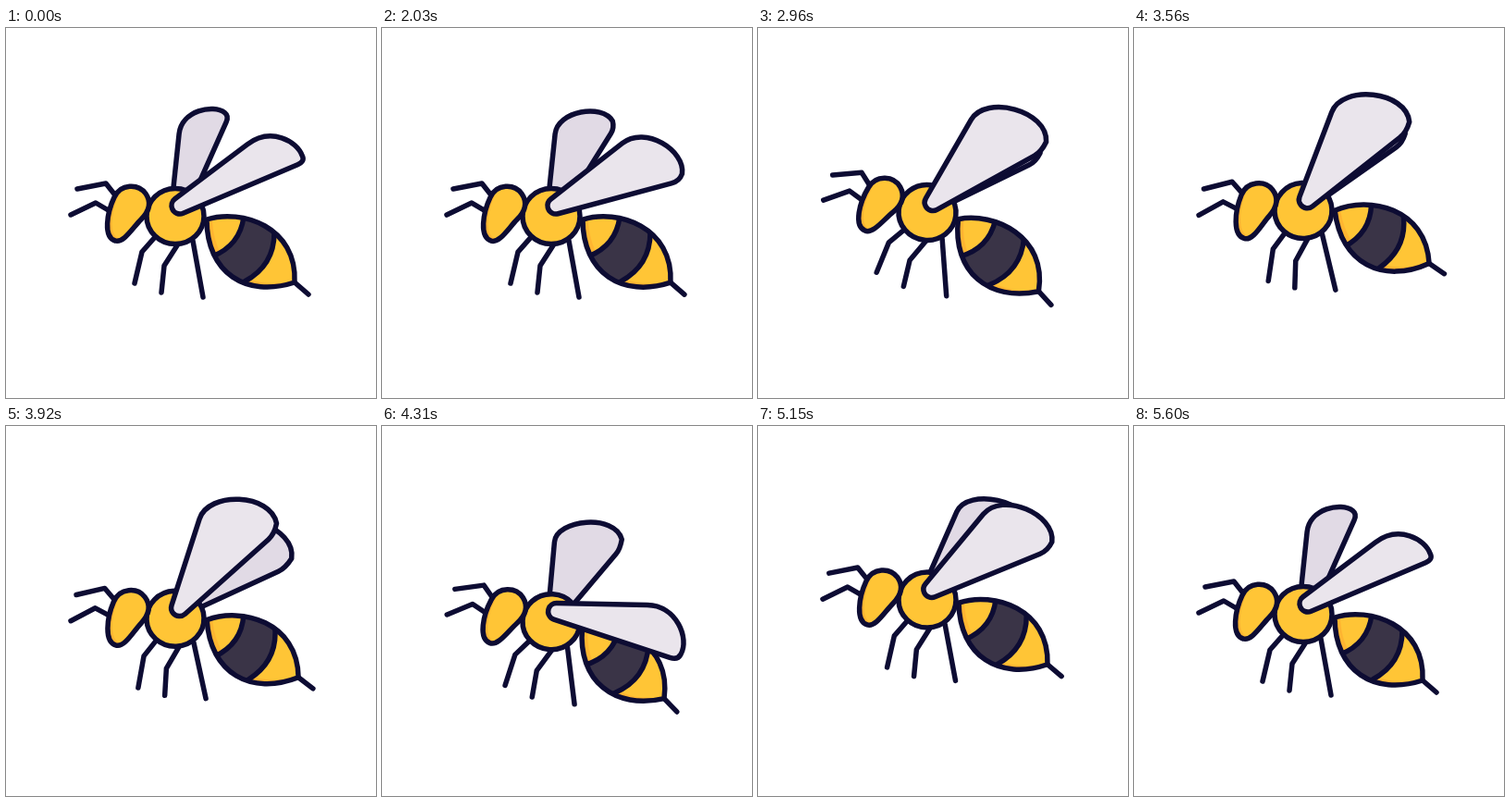
Animation, 400 px wide and 400 px high, one loop 5.66 s. Source, as an HTML page with a canvas:

```html
<!DOCTYPE html>
<html lang="en">
<head>
<meta charset="utf-8">
<title>Wasp</title>
<style>
html, body { margin: 0; width: 100%; height: 100%; overflow: hidden; background: #fff; }
canvas { display: block; width: 400px; height: 400px; }
</style>
</head>
<body>
<canvas id="stage" width="400" height="400"></canvas>
<script>
const ctx = document.getElementById('stage').getContext('2d');
const LOOP = 5660, START = 2030, STEP = 30, FLIGHT = 3600, FLAP = 300;
const INK = '#0d0c33', YELLOW = '#ffc536', ORANGE = '#ffb531', STRIPE = '#3a3447';
const RAD = Math.PI / 180, CENTER = [183, 203.5];

// Tracks: [ms, value] pairs, joined by a smooth spline
const bob = [[0, 0], [550, 8], [960, -4], [1280, -18], [1560, -6], [2260, 9], [2760, -14], [3000, -20], [3600, 0]];
const turn = [[0, 0], [400, 1.5], [900, 6], [960, 6], [1560, -3.2], [1740, -4], [2310, 3.2], [2650, 6.3], [2760, 6], [3300, -2], [3600, 0]];
const tail = [[0, 0], [450, 4.5], [900, 7], [1560, -6.3], [1740, -7], [2310, 5.2], [2480, 5.7], [2760, 4], [3300, -2], [3600, 0]];

// Wing tracks over one flap: angle of the leading edge, and spread in degrees
const frontEdge = [[0, -37], [30, -38], [60, -66], [100, -77], [150, -50], [180, -12], [210, -2], [250, -14], [300, -37]];
const frontSpread = [[0, 14], [30, 23], [60, 31], [150, 28], [210, 17], [300, 14]];
const backEdge = [[0, -84], [30, -84], [60, -62], [100, -52], [150, -66], [210, -88], [300, -84]];
const backSpread = [[0, 18], [30, 26], [60, 30], [150, 34], [210, 35], [300, 18]];

const head = new Path2D('M118 230C105 226 109 200 117 183C124 168 143 168 151 179C158 189 155 198 146 207C137 216 127 233 118 230Z');
const abdomen = new Path2D('M217 207C255 195 315 215 312 275C260 292 217 265 217 207Z');
const stripe = new Path2D('M257 204Q253 235 223 247L240 290L258 274Q291 256 290 219L280 190Z');
const thorax = new Path2D();
thorax.ellipse(...CENTER, 31, 30, 0, 0, 7);
const antennae = new Path2D('M77 174L108 168L119 182M70 202L97 189L114 199');
const frontLeg = new Path2D('M162 225L147 242L139 276');
const midLeg = new Path2D('M187 232L171 257L168 286');
const hindLeg = new Path2D('M202 230L213 291');
const stinger = new Path2D('M312 275L327 288');

function sample(track, t) {
  const last = track.length - 1;
  let i = 0;
  while (i < last - 1 && t > track[i + 1][0]) i++;
  const slope = k => k <= 0 || k >= last ? 0
    : (track[k + 1][1] - track[k - 1][1]) / (track[k + 1][0] - track[k - 1][0]);
  const [t0, a] = track[i], [t1, b] = track[i + 1];
  const d = t1 - t0, x = (t - t0) / d, y = 1 - x;
  return a * y * y * (1 + 2 * x) + b * x * x * (1 + 2 * y)
    + d * x * y * (slope(i) * y - slope(i + 1) * x);
}

function turned(degrees, draw) {
  ctx.save();
  ctx.translate(...CENTER);
  ctx.rotate(degrees * RAD);
  ctx.translate(-CENTER[0], -CENTER[1]);
  draw();
  ctx.restore();
}

function shaded(path, dx, dy, band) {
  ctx.save();
  ctx.clip(path);
  ctx.fillStyle = ORANGE;
  ctx.fill(path);
  ctx.translate(dx, dy);
  ctx.fillStyle = YELLOW;
  ctx.fill(path);
  ctx.translate(-dx, -dy);
  if (band) {
    ctx.fillStyle = STRIPE;
    ctx.fill(band);
    ctx.stroke(band);
  }
  ctx.restore();
  ctx.stroke(path);
}

function wing(edge, spread, size, color) {
  const root = 9, x = 188, y = 192;
  const trail = edge + spread;
  // Point at a distance along an edge and to its upper side
  const at = (deg, along, up) => {
    const c = Math.cos(deg * RAD), s = Math.sin(deg * RAD);
    return [x + along * c + up * s, y + along * s - up * c];
  };
  const end = (146 - 0.83 * spread) * size;
  const tip = end + 0.6 * spread * size, rise = 7 * size - root;
  ctx.beginPath();
  ctx.arc(x, y, root, (trail + 90) * RAD, (edge + 270) * RAD);
  ctx.lineTo(...at(edge, 98 * size, root));
  ctx.bezierCurveTo(
    ...at(edge, 130 * size, root),
    ...at(trail, tip + (spread - 13) * size, rise + (7 + 0.7 * spread) * size),
    ...at(trail, tip, rise));
  ctx.quadraticCurveTo(...at(trail, end + 9 * size, -root), ...at(trail, end, -root));
  ctx.closePath();
  ctx.fillStyle = color;
  ctx.fill();
  ctx.stroke();
}

function draw(t) {
  const e = t < START ? 0 : Math.min(FLIGHT, (Math.floor((t - START) / STEP) + 1) * STEP);
  const phase = e % FLAP, angle = sample(turn, e);
  const back = sample(backEdge, phase);

  ctx.fillStyle = '#fff';
  ctx.fillRect(0, 0, 400, 400);
  ctx.strokeStyle = INK;
  ctx.lineWidth = 5.5;
  ctx.lineCap = ctx.lineJoin = 'round';

  ctx.save();
  ctx.translate(0, sample(bob, e));
  turned(angle * 1.5, () => ctx.stroke(frontLeg));
  turned(angle * 1.25, () => ctx.stroke(midLeg));
  turned(angle, () => {
    ctx.stroke(hindLeg);
    ctx.stroke(antennae);
    wing(back, sample(backSpread, phase), 0.78 + 0.006 * (back + 85), '#e1dae5');
  });
  turned(sample(tail, e), () => {
    ctx.stroke(stinger);
    shaded(abdomen, 6, -4, stripe);
  });
  turned(angle, () => {
    shaded(thorax, 2, -1);
    shaded(head, 5, -2);
    wing(sample(frontEdge, phase), sample(frontSpread, phase), 1, '#eae5ec');
  });
  ctx.restore();
}

const began = performance.now();
function tick() {
  draw((performance.now() - began) % LOOP);
  requestAnimationFrame(tick);
}
tick();
</script>
</body>
</html>
```
